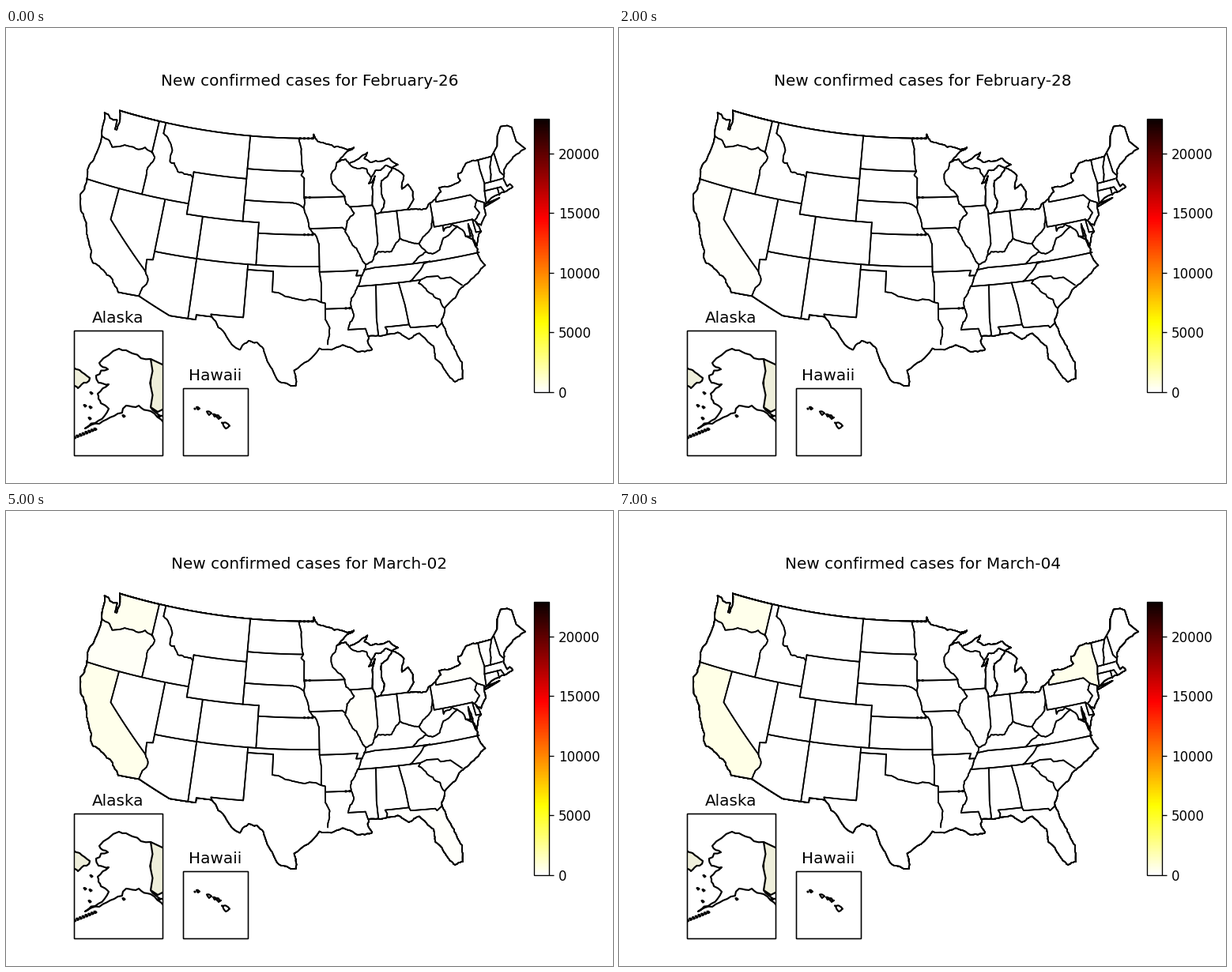
Write a matplotlib script that moves like this. It is 768 by 576 pixels and loops after 8 s.

```python
import numpy as np
import matplotlib.pyplot as plt
from matplotlib.animation import FuncAnimation
from matplotlib.collections import LineCollection
from matplotlib.patches import Polygon, Rectangle

W, H = 768, 576
DAYS = [f"February-{d}" for d in range(26, 30)] + [f"March-0{d}" for d in range(1, 5)]
# colour-map level per state and day; a missing state is white
LEVELS = [
    {},
    dict(CA=1),
    dict(CA=1, OR=1, WA=1),
    dict(WA=4, OR=1, CA=1),
    dict(WA=3, IL=2),
    dict(WA=4, CA=5, OR=2, IL=1, NY=1, FL=1),
    dict(WA=3, CA=3, NY=1, FL=1),
    dict(WA=5, CA=6, NY=5),
]
CMAP = plt.get_cmap("hot_r")
LAND = (0.9375, 0.9375, 0.859)

rng = np.random.default_rng(4)
lines = []


def subdivide(points, amp=0.0, levels=4):
    """Halve every segment repeatedly, pushing midpoints sideways by amp."""
    p = np.reshape(points, (-1, 2)).astype(float)
    for _ in range(levels):
        d = np.diff(p, axis=0)
        side = np.column_stack([-d[:, 1], d[:, 0]])
        mid = p[:-1] + d / 2 + amp * rng.normal(size=(len(d), 1)) * side
        out = np.empty((2 * len(p) - 1, 2))
        out[::2], out[1::2] = p, mid
        p = out
    return p


def cone(lat):
    """Radius term of the Lambert conformal projection on the ellipsoid."""
    s, e = np.sin(np.radians(lat)), 0.0818192
    return np.arctanh(s) - e * np.arctanh(e * s)


def scale_at(lat):
    s, e = np.sin(np.radians(lat)), 0.0818192
    return np.log(np.cos(np.radians(lat)) / np.sqrt(1 - (e * s) ** 2))


# standard parallels 33 and 45, centred on 96 W
N = (scale_at(33) - scale_at(45)) / (cone(45) - cone(33))
F = np.exp(scale_at(33) + N * cone(33)) / N


def project(p):
    rho = 777.5 * F * np.exp(-N * cone(p[:, 1]))
    a = N * np.radians(96 - p[:, 0])
    return np.column_stack([381.6 + rho * np.sin(a), rho * np.cos(a) - 679.2])


def border(*v):
    """Straight border through (west longitude, latitude) pairs."""
    lines.append(project(subdivide(v)))
    return lines[-1]


def wild(*v):
    """Irregular shore or river through a few key points."""
    lines.append(project(subdivide(v, 0.06, 3)))
    return lines[-1]


def meridian(lon, south, north):
    return border(lon, south, lon, north)


def parallel(lat, east, west):
    return border(east, lat, west, lat)


# outer edge, counter-clockwise from the north-west
wa_coast = wild(122.76, 49, 122.35, 48.2, 122.4, 47.2, 122.65, 47.2, 122.75, 48.1,
                124.7, 48.4, 124.05, 46.25)
or_coast = wild(124.05, 46.25, 124.05, 44.6, 124.5, 42.85, 124.2, 42)
ca_coast = wild(124.2, 42, 124.1, 41, 124.4, 40.4, 123.75, 39, 122.5, 37.6, 121.9, 36.6,
                120.65, 34.6, 119.2, 34.15, 118.4, 33.8, 117.1, 32.53)
mexico = border(117.1, 32.53, 114.75, 32.6, 111.07, 31.33, 108.2, 31.33, 108.2, 31.78,
                106.5, 31.78)
rio = wild(106.5, 31.78, 104.7, 30.1, 103.15, 28.97, 102.3, 29.88, 101.4, 29.77,
           100.3, 28.3, 99.1, 26.4, 97.2, 25.9)
gulf = wild(97.2, 25.9, 97.4, 27.3, 94.75, 29.35, 92.3, 29.6, 91.2, 29.2, 89.2, 29,
            89.6, 29.8, 89.4, 30.3, 87.5, 30.28)
fl_coast = wild(87.5, 30.28, 86.3, 30.4, 85.2, 29.65, 84, 30.07, 82.7, 28.7, 82.7, 27.5,
                81.8, 26.1, 81.1, 25.15, 80.3, 25.3, 80.05, 26.8, 80.6, 28.4, 81.45, 30.72)
atlantic = wild(81.45, 30.72, 80.9, 32.03, 79.2, 33.2, 78, 33.9, 76.5, 34.65, 75.5, 35.25,
                75.95, 36.9)
bays = wild(75.95, 36.9, 76.3, 37.9, 77, 38.3, 76.4, 38.2, 76.4, 39.4, 76.2, 38.6,
            75.95, 37.2, 75.1, 38.4, 75.5, 39.5, 74.9, 39, 74.1, 39.8, 74, 40.7)
new_england = wild(74, 40.7, 72.9, 41.25, 71.3, 41.5, 70.6, 41.6, 69.95, 41.7, 70.2, 42.05,
                   70.6, 41.9, 70.8, 42.7, 70.4, 43.5, 68.8, 44.4, 66.97, 44.8)
maine = border(66.97, 44.8, 67.8, 45.7, 67.8, 47.07, 68.3, 47.35, 69.2, 47.45, 70, 46.7,
               70.4, 45.8, 71.5, 45.01, 73.34, 45.01)
ny_lake = wild(73.34, 45.01, 74.9, 45, 76.3, 44.2, 76.2, 43.5, 79.06, 43.26, 78.9, 42.85,
               79.76, 42.27)
lower_lakes = wild(79.76, 42.27, 81.7, 41.5, 83.45, 41.73, 82.5, 42.6, 82.45, 43.3,
                   82.95, 44.07, 83.8, 43.7, 83.3, 44.9, 84.75, 45.78, 85.5, 45, 86.3, 44.7,
                   86.45, 43.7, 86.2, 42.8, 86.8, 41.76, 87.4, 41.65, 87.8, 42.49)
upper_lakes = wild(87.8, 42.49, 87.6, 44.2, 87.1, 45.2, 88, 44.55, 87.6, 45.1, 87, 45.7,
                   85.5, 46.08, 83.9, 46, 85, 46.7, 87.4, 46.5, 88.3, 46.9, 87.8, 47.45,
                   90.4, 46.55, 90.8, 46.95, 92.05, 46.7, 89.6, 48)
woods = wild(89.6, 48, 91.5, 48.1, 94.6, 48.72, 95.15, 49.38, 95.15, 49)
north = parallel(49, 95.15, 122.76)
mainland = [wa_coast, or_coast, ca_coast, mexico, rio, gulf, fl_coast, atlantic, bays,
            new_england, maine, ny_lake, lower_lakes, upper_lakes, woods, north]
island = border(74, 40.6, 71.9, 41.07, 73.75, 40.85, 74, 40.6)
coast = mainland + [island]

# west
columbia = wild(124.05, 46.25, 122.85, 46, 122.3, 45.55, 119.2, 46, 116.92, 46)
wa_north = parallel(49, 117.03, 122.76)
wa_east = meridian(117, 49, 46)
or_east = wild(116.92, 46, 116.5, 45.6, 117.1, 44.4, 117.03, 43.8)
or_side = meridian(117.03, 43.8, 42)
ca_north = parallel(42, 124.2, 120)
parallel(42, 120, 111.05)
ca_east = border(120, 42, 120, 39, 114.63, 35)
ca_river = wild(114.63, 35, 114.15, 34.27, 114.6, 33.4, 114.75, 32.6)
wild(116.05, 48, 114.4, 46.65, 114.4, 45.55, 113.8, 45.5, 113.1, 44.75, 111.4, 44.7,
     111.05, 44.48)
meridian(116.05, 48, 49)
border(114.04, 42, 114.04, 36.2, 114.75, 36.1, 114.63, 35)
meridian(111.05, 41, 45)
meridian(109.05, 31.33, 41)
meridian(104.05, 41, 49)
meridian(102.05, 37, 41)
parallel(45, 104.05, 111.05)
parallel(41, 102.05, 111.05)
parallel(37, 94.62, 114.04)
border(103, 37, 103, 36.5, 103.06, 32, 106.62, 32, 106.5, 31.78)

# plains
parallel(45.94, 96.56, 104.05)
parallel(43, 98.5, 104.05)
parallel(40, 95.3, 102.05)
parallel(43.5, 91.22, 96.45)
wild(98.5, 43, 97.2, 42.85, 96.45, 42.49)
wild(97.23, 49, 96.8, 47, 96.56, 45.94, 96.85, 45.6, 96.45, 45.3)
meridian(96.45, 45.3, 43.5)
wild(96.45, 43.5, 96.45, 42.49, 95.85, 41, 95.77, 40.58, 94.9, 39.8, 94.62, 39.1)
border(95.77, 40.58, 91.72, 40.6, 91.42, 40.38)
border(94.62, 39.1, 94.62, 36.5, 94.43, 35.4, 94.48, 33.64, 94.04, 33.55, 94.04, 32)
parallel(33.01, 91.17, 94.04)
border(103, 36.5, 100, 36.5, 100, 34.56)
wild(100, 34.56, 98.1, 34.13, 96.6, 33.85, 94.48, 33.64)
wild(94.04, 32, 93.6, 31.2, 93.85, 29.7)
border(94.62, 36.5, 90.15, 36.5, 90.38, 36, 89.7, 36)

# Mississippi and Ohio valleys
wild(92.05, 46.7, 92.3, 46.1, 92.87, 45.65, 92.75, 44.75, 91.22, 43.5, 91.1, 42.8, 90.65, 42.5)
il_west = wild(90.65, 42.5, 90.15, 41.9, 91.1, 41.2, 91.4, 40.2, 90.7, 39.1, 90.15, 38.6,
               89.5, 37.3, 89.15, 37)
il_south = wild(89.15, 37, 88.45, 37.2, 88.05, 37.8)
il_east = wild(87.53, 39.35, 87.95, 38.2, 88.05, 37.8)
il_side = meridian(87.53, 41.7, 39.35)
il_north = parallel(42.5, 90.65, 87.8)
wild(89.15, 37, 89.7, 36, 90.3, 35, 91.1, 33.9, 91.17, 33, 90.9, 32.3, 91.6, 31)
border(91.6, 31, 89.73, 31, 89.5, 30.25)
wild(88.05, 37.8, 86, 38, 85.42, 38.7, 84.82, 39.1, 83.7, 38.65, 82.6, 38.42, 81.75, 39.1,
     80.85, 39.7, 80.52, 40.64)
meridian(84.82, 39.1, 41.73)
parallel(41.73, 83.45, 86.8)
wild(90.4, 46.55, 88.1, 45.92, 87.6, 45.1)

# south-east
parallel(36.55, 75.87, 81.68)
border(81.68, 36.59, 83.68, 36.6, 88.07, 36.65, 89.45, 36.5)
parallel(35, 83.1, 90.3)
wild(84.32, 35, 82.9, 35.95, 81.68, 36.59)
border(83.1, 35, 82.3, 35.2, 81.04, 35.1, 80.8, 34.82, 79.67, 34.8, 78.55, 33.87)
wild(83.1, 35, 83.35, 34.7, 81.95, 33.5, 80.9, 32.03)
border(85.6, 35, 85.18, 32.86, 85.05, 31.55, 85, 31)
al_fl = border(85, 31, 87.6, 31, 87.4, 30.65, 87.5, 30.28)
ga_fl = border(85, 31, 84.86, 30.7, 82.2, 30.57, 82.05, 30.36, 81.45, 30.72)
border(88.2, 35, 88.45, 31.9, 88.4, 30.35)
wild(83.68, 36.6, 81.97, 37.54, 82.6, 38.42)
wild(81.97, 37.54, 81.2, 37.25, 80.3, 37.55, 79.65, 38.55, 78.87, 38.77, 77.72, 39.32)

# north-east
border(80.52, 41.98, 80.52, 39.72, 75.79, 39.72, 75.5, 39.5)
border(75.79, 39.72, 75.7, 38.46, 75.05, 38.45)
wild(77, 38.3, 77.05, 38.7, 77.72, 39.32, 78.4, 39.62, 79.48, 39.2)
meridian(79.48, 39.2, 39.72)
wild(75.5, 39.6, 74.75, 40.2, 75.15, 40.8, 74.7, 41.36)
ny_south = border(74.7, 41.36, 75.35, 42, 79.76, 42, 79.76, 42.27)
ny_tail = border(74.7, 41.36, 73.9, 41, 74, 40.7)
ny_east = border(73.34, 45.01, 73.4, 44.1, 73.27, 42.75, 73.5, 42.05, 73.65, 41)
wild(71.5, 45.01, 72.05, 44.1, 72.45, 42.73)
parallel(42.73, 73.27, 71)
border(73.5, 42.05, 71.38, 42.02, 71.12, 41.5)
meridian(71.83, 42.02, 41.32)
border(71.08, 45.3, 70.98, 43.4, 70.7, 43.07)

STATES = {
    "WA": [wa_coast, columbia, wa_east[::-1], wa_north],
    "OR": [or_coast, ca_north, or_side[::-1], or_east[::-1], columbia[::-1]],
    "CA": [ca_coast, ca_river[::-1], ca_east[::-1], ca_north[::-1]],
    "IL": [il_west, il_south, il_east[::-1], il_side[::-1], il_north[::-1]],
    "NY": [ny_lake, ny_south[::-1], ny_tail, ny_east[::-1]],
    "FL": [fl_coast, ga_fl[::-1], al_fl],
}

fig = plt.figure(figsize=(W / 120, H / 120), dpi=120, facecolor="white")
ax = fig.add_axes([0, 0, 1, 1])
ax.set(xlim=(0, W), ylim=(H, 0))
ax.axis("off")


def label(x, y, text):
    return ax.text(x, y, text, size=12, ha="center", va="baseline")


def strokes(paths, z):
    c = LineCollection(paths, colors="k", linewidths=1, zorder=z, capstyle="round")
    return ax.add_collection(c)


def fill(parts, z=3):
    return ax.add_patch(Polygon(np.vstack(parts), fc="w", ec="none", zorder=z))


# each day redraws the map over the last one, so the outer edge grows heavier
layers = [strokes(coast, 1) for _ in DAYS]
fill(mainland, z=2)
fills = {name: [fill(parts)] for name, parts in STATES.items()}
fills["NY"].append(fill([island]))
for _ in range(2):
    strokes(lines, 4)

# rough spots along the parallels
for east, west, lat in [(95.2, 97.2, 49), (95.6, 96.5, 43.5), (95.3, 96.5, 40), (91.2, 92, 33)]:
    spot = project(subdivide([east, lat, west, lat]))
    ax.plot(*spot.T, "k", lw=1.9, ls=(0, (0.8, 0.8)), zorder=4)


def inset(x, y, w, h, name):
    for face, z in [("w", 5), ("none", 8)]:
        box = Rectangle((x, y), w, h, fc=face, ec="k", lw=0.8, zorder=z)
        ax.add_patch(box)
    label(x + w / 2, y - 10, name)
    return box


def land(box, points, color="w", amp=0.1):
    p = Polygon(subdivide(points, amp, 2), fc=color, ec="k", lw=1.3, zorder=6,
                joinstyle="round")
    ax.add_patch(p)
    p.set_clip_path(box)


def islet(box, x, y, r):
    """Small island slanting down to the right."""
    land(box, [x - r, y - r / 2, x, y - r / 2, x + r, y + r / 3, x, y + r, x - r, y - r / 2])


alaska = inset(86, 383, 112, 158, "Alaska")
land(alaska, [183, 419, 200, 427, 200, 482, 192, 486, 183, 480], LAND, 0)
land(alaska, [84, 430, 93, 433, 106, 443, 102, 449, 91, 456, 84, 452], LAND)
land(alaska, [183, 419, 160, 412, 143, 406, 118, 424, 129, 432, 114, 440, 117, 449,
              130, 451, 116, 463, 120, 475, 130, 482, 117, 497, 100, 507, 118, 501,
              137, 491, 152, 478, 168, 478, 183, 485, 200, 500, 200, 493, 190, 487,
              183, 480, 183, 419])
for x in np.linspace(87, 113, 8):
    islet(alaska, x, 518 - 0.4 * (x - 87), 1.5)
for x, y in [(100, 478), (107, 480), (106, 494), (108, 462), (149, 491), (194, 491)]:
    islet(alaska, x, y, 1.5)

hawaii = inset(224, 456, 82, 85, "Hawaii")
for x, y, r in [(239, 482, 0.6), (243, 481, 2), (257, 487, 3), (264, 490, 2), (269, 492, 3),
                (278, 502, 5)]:
    islet(hawaii, x, y, r)

cax = fig.add_axes([0.87, 0.2, 0.025, 0.6])
shades = plt.cm.ScalarMappable(norm=plt.Normalize(0, 22900), cmap=CMAP)
fig.colorbar(shades, cax=cax, ticks=range(0, 20001, 5000))

title = label(W / 2, 73, "")


def update(i):
    title.set_text("New confirmed cases for " + DAYS[i])
    for k, layer in enumerate(layers):
        layer.set_visible(k <= i)
    for name, patches in fills.items():
        for p in patches:
            p.set_facecolor(CMAP(LEVELS[i].get(name, 0)))
    return [title]


anim = FuncAnimation(fig, update, frames=len(DAYS), interval=1000, repeat=True, repeat_delay=0)
plt.show()
```
